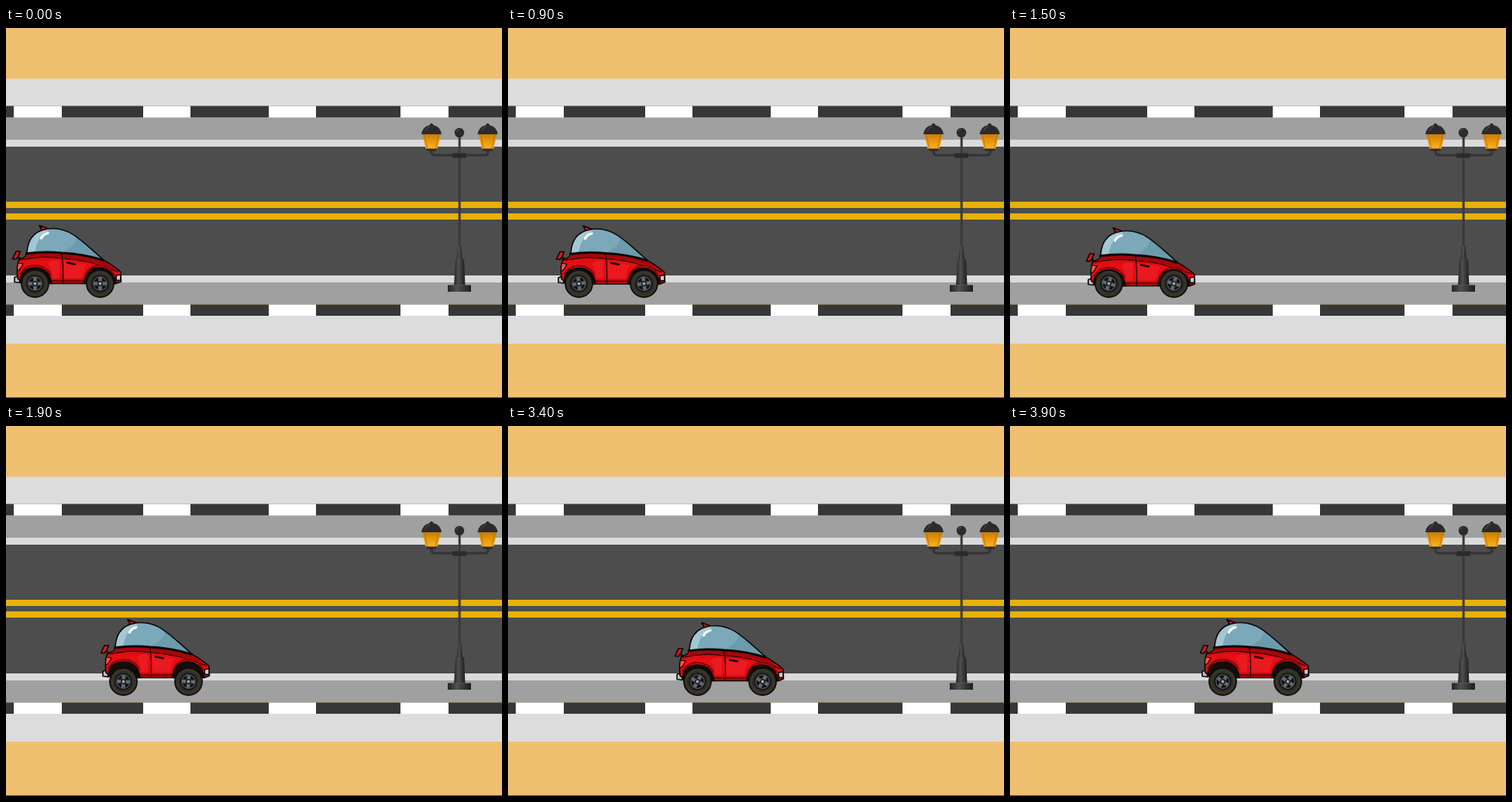
Animation of 640 by 477 pixels, one loop 4000 ms. Source, as an HTML page:

```html
<!DOCTYPE html>
<html lang="en">
<head>
<meta charset="utf-8">
<title>Car on a road</title>
<style>
html, body { margin: 0; width: 100%; height: 100%; overflow: hidden; background: #efc070; }
svg { display: block; width: 100%; height: 100%; }
.line { stroke: #0b0808; stroke-width: 1.6; stroke-linejoin: round; stroke-linecap: round; }
.thin { fill: none; stroke: #1a0505; stroke-width: 1.2; stroke-linecap: round; }
</style>
</head>
<body>
<svg viewBox="0 0 640 477" preserveAspectRatio="none">
  <defs>
    <linearGradient id="amber" x2="0" y2="1">
      <stop offset="0" stop-color="#c47a08"/><stop offset=".5" stop-color="#e8960c"/><stop offset="1" stop-color="#ffb41c"/>
    </linearGradient>
    <linearGradient id="iron">
      <stop offset="0" stop-color="#252525"/><stop offset=".4" stop-color="#505050"/><stop offset="1" stop-color="#1d1d1d"/>
    </linearGradient>
    <linearGradient id="paint" x2="0" y2="1">
      <stop offset="0" stop-color="#c5080c"/><stop offset=".35" stop-color="#e50f14"/><stop offset=".75" stop-color="#e20d12"/><stop offset="1" stop-color="#b0070b"/>
    </linearGradient>
    <clipPath id="pane"><path d="M27 290C28 271 37 259 60 258.500C85 258 100 277 126 299Q98 290 72 289Z"/></clipPath>

    <g id="lantern">
      <path d="M-12 136H12L7.500 156H-7.500Z" fill="url(#amber)"/>
      <path d="M-9 138L-5.500 155M9 138L5.500 155" stroke="#b97408" fill="none"/>
      <path d="M-13 137Q-11.500 127 -3 125.500L-1 123H1L3 125.500Q11.500 127 13 137Z" fill="#2b2b2d"/>
      <path d="M-8 133Q-6 128 -2 127" stroke="#55555a" fill="none"/>
      <path d="M-8 155.500H8L5 158.500H-5Z" fill="#2b2b2d"/>
    </g>

    <g id="wheel">
      <circle r="17.600" fill="#302e25" stroke="#0c0b08" stroke-width="1.600"/>
      <circle r="14.500" fill="none" stroke="#3d3a2e" stroke-width="1.500"/>
      <circle r="11" fill="#111214"/>
      <g class="spin">
        <path d="M0-8.500V8.500M-8.500 0H8.500" stroke="#646a70" stroke-width="4.600"/>
        <circle r="8.800" fill="none" stroke="#4d5257" stroke-width="1.400"/>
        <circle r="3.600" fill="#24272a"/>
        <circle r="1.800" fill="#a5abb0"/>
      </g>
    </g>
  </defs>

  <g id="road"></g>

  <g id="lamp">
    <path d="M549 157V160Q549 164 554 164H617Q622 164 622 160V157" fill="none" stroke="#343436" stroke-width="3.200"/>
    <rect x="583.700" y="138" width="3" height="146" fill="#3a3a3c"/>
    <circle cx="585" cy="135" r="6.200" fill="#2b2b2d"/>
    <path d="M581 134Q582 131 585 130.500" fill="none" stroke="#55555a"/>
    <rect x="576" y="161.500" width="18" height="6" rx="1" fill="#2b2b2d"/>
    <path d="M583 281H587.500L589 299H581.500Z" fill="url(#iron)"/>
    <path d="M580 298H591L592.500 332H578Z" fill="url(#iron)"/>
    <rect x="570" y="331" width="30" height="9" fill="url(#iron)"/>
    <path d="M570 331.500H600" stroke="#555"/>
    <use href="#lantern" x="549"/>
    <use href="#lantern" x="621.500"/>
  </g>

  <g id="car">
    <g id="shell">
      <path class="line" d="M20 299L16 294L18.500 288H13L8.500 297.500L13 298L15 295L18 301Z" fill="#d7141a"/>
      <path class="line" d="M43 254.500L55 259L47 262Z" fill="#d7141a"/>
      <path class="line" d="M14.500 320L11 321.500V327.500L18 328.500V321Z" fill="#b9bec2"/>
      <path class="line" d="M27 289Q50 286 72 289Q100 290 124 298Q138 306 148 314.500L148.500 327L142 329.500H22L15 323Q13.500 308 16 300Q21 296 25 295Z" fill="url(#paint)"/>
      <path d="M25 296Q49 293 72 296L112 302Q132 307 145 315L124 298Q98 290 72 289L27 290Z" fill="#a5070b"/>
      <path d="M58 300Q64 298 69 300V323H60Q59 309 54 304ZM75 301L104 305Q99 311 98 323H75Z" fill="#f0252a" opacity=".55"/>
      <g clip-path="url(#pane)">
        <path d="M20 250H130V305H20Z" fill="#7ba9b9"/>
        <path d="M27 290Q30 260 62 257L54 262Q40 269 37 290Z" fill="#a2c8d4"/>
        <path d="M70 290Q94 281 90 264L130 300V305Z" fill="#6b9bac"/>
      </g>
      <path class="line" d="M27 290C28 271 37 259 60 258.500C85 258 100 277 126 299" fill="none" stroke-width="2"/>
      <path d="M45.500 271Q48 266 54 264.500" fill="none" stroke="#fff" stroke-width="3.200" stroke-linecap="round"/>
      <path d="M25 291Q49 287.500 72 290Q99 291 126 299.500" fill="none" stroke="#100707" stroke-width="3"/>
      <path class="thin" d="M20 299Q46 293 73 297Q108 299 144 314"/>
      <path class="thin" d="M71.500 290Q74 301 73.500 329M58 326H103"/>
      <path d="M79 302.500L89 304.500" stroke="#190606" stroke-width="2.400" stroke-linecap="round"/>
      <path class="thin" d="M16 303L22 304L18 311L15 313" style="fill:#ff5550"/>
      <path class="line" d="M18 328Q18 310 37 309Q56 309 59 329.500ZM101 329.500Q102 309 121 309Q138 310 142 329.500Z" fill="#160b0a"/>
      <path d="M18 318Q24 306 38 306Q53 307 58 319M102 319Q108 306 121 306Q135 307 140 319" fill="none" stroke="#86060a" stroke-width="2"/>
      <path class="line" d="M142 319L148 318V325L142.500 325.500Z" fill="#c8cdd0"/>
    </g>
    <use class="tyre" href="#wheel" x="37.500" y="329.500"/>
    <use class="tyre" href="#wheel" x="121.500" y="329.500"/>
  </g>
</svg>
<script>
const byId = id => document.getElementById(id);
const road = byId("road"), car = byId("car"), shell = byId("shell");
const spin = document.querySelector(".spin");

function bar(x, y, w, h, fill) {
  const r = document.createElementNS("http://www.w3.org/2000/svg", "rect");
  Object.entries({ x, y, width: w, height: h, fill }).forEach(([k, v]) => r.setAttribute(k, v));
  road.append(r);
}

// Each band: top edge and colour, running down to the next one.
const bands = [
  [0, "#efc070"], [65.5, "#dcdcdc"], [100.5, "#373737"], [115.5, "#a0a0a0"],
  [144, "#dadada"], [153, "#4d4d4d"], [224, "#e8b108"], [232, "#4d4d4d"],
  [239, "#e8b108"], [247, "#4d4d4d"], [319, "#dadada"], [328, "#a0a0a0"],
  [356.5, "#373737"], [371, "#dcdcdc"], [407, "#efc070"], [476, "#4a4540"]
];
bands.forEach(([y, fill], i) => {
  const end = i + 1 < bands.length ? bands[i + 1][0] : 477;
  bar(0, y, 640, end - y, fill);
});
for (const y of [100.5, 356.5])
  for (const [x, w] of [[10, 62], [177, 61], [339, 61], [509, 62]])
    bar(x, y, w, y < 200 ? 15 : 14.5, "#fff");

const LOOP = 4000, STEP = 100;
const bounce = [0, 3, 0.5, -1, -5, -5, -1];

function draw(ms) {
  let n = Math.floor((ms % LOOP) / STEP);
  if (n > 24 && n < 34) n = 24; // pause, then jump ahead
  const x = n * 6 + (n >= 34 ? 3 : 0);
  car.setAttribute("transform", `translate(${x} 0)`);
  shell.setAttribute("transform", `translate(0 ${bounce[n % bounce.length]})`);
  spin.setAttribute("transform", `rotate(${x / 18 * 180 / Math.PI})`);
}

const start = performance.now();
function tick() {
  draw(performance.now() - start);
  requestAnimationFrame(tick);
}
draw(0);
requestAnimationFrame(tick);
</script>
</body>
</html>
```
